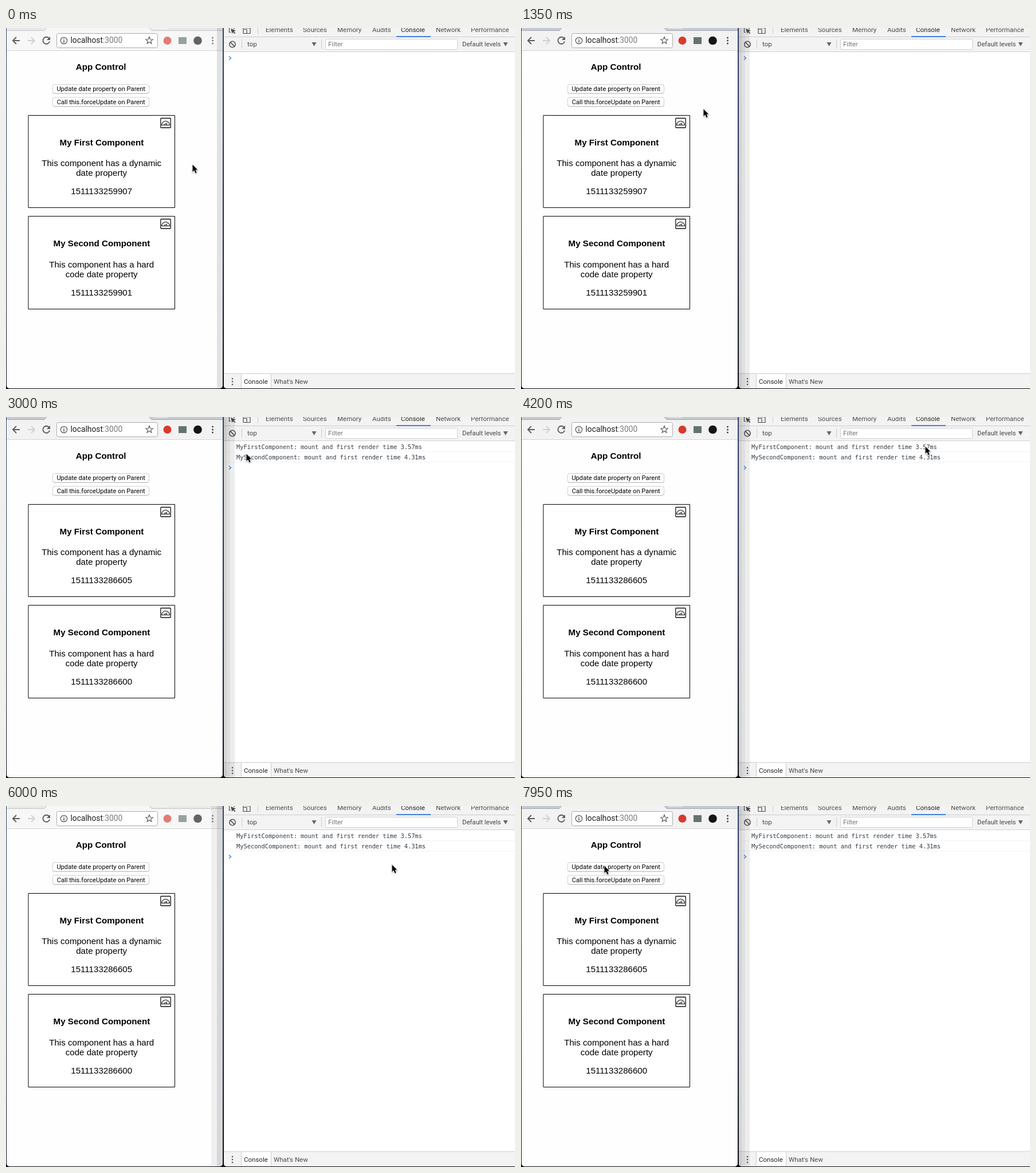
An HTML page with a canvas for the animation above (8000 ms loop, 888 px wide and 630 px high).

```html
<!DOCTYPE html>
<html lang="en">
<head>
<meta charset="utf-8">
<title>Render timing demo</title>
<style>
html, body { margin: 0; width: 100%; height: 100%; overflow: hidden; background: #fff; }
canvas { display: block; }
</style>
</head>
<body>
<canvas id="stage" width="888" height="630"></canvas>
<script>
const ctx = document.getElementById('stage').getContext('2d');
const LOOP = 8000, STEP = 150;
const SANS = '"Liberation Sans", Arial, sans-serif';
const UI = 'Roboto, sans-serif';
const MONO = '"DejaVu Sans Mono", monospace';
const BODY = '15.1px ' + SANS, HEAD = 'bold 15.2px ' + SANS;

// Pointer keys: time, x, y
const PATH = [
  [0, 325, 238], [300, 325, 238], [450, 327, 242], [600, 326, 243], [1050, 326, 243],
  [1200, 324, 205], [1350, 318, 141], [1500, 225, 80], [1650, 120, 40], [1800, 76, 22],
  [1950, 71, 19], [2550, 71, 19], [2700, 95, 24], [2850, 240, 45], [3000, 419, 64],
  [3150, 540, 68], [3300, 610, 60], [3600, 643, 53], [3750, 674, 52], [4050, 674, 52],
  [4200, 705, 51], [4500, 707, 51], [4950, 680, 50], [5100, 680, 50], [5400, 700, 58],
  [5700, 694, 82], [6000, 673, 102], [6150, 672, 103], [6450, 600, 108], [6750, 390, 112],
  [7050, 318, 112], [7200, 316, 112], [7500, 235, 108], [7800, 152, 104], [7950, 145, 104]
];

function pointerAt(t) {
  const i = PATH.findIndex(k => k[0] >= t);
  if (i <= 0) return PATH[0].slice(1);
  const [t0, x0, y0] = PATH[i - 1], [t1, x1, y1] = PATH[i];
  const p = (t - t0) / (t1 - t0);
  return [x0 + (x1 - x0) * p, y0 + (y1 - y0) * p];
}

function rect(x, y, w, h, color) {
  ctx.fillStyle = color;
  ctx.fillRect(x, y, w, h);
}

function text(s, x, y, font, color = '#000', align = 'left') {
  ctx.font = font;
  ctx.fillStyle = color;
  ctx.textAlign = align;
  ctx.fillText(s, x, y);
}

function box(x, y, w, h, r, stroke, fill) {
  ctx.beginPath();
  ctx.roundRect(x, y, w, h, r);
  if (fill) { ctx.fillStyle = fill; ctx.fill(); }
  if (stroke) { ctx.strokeStyle = stroke; ctx.stroke(); }
}

function path(d, stroke, width = 1, fill) {
  const p = new Path2D(d);
  ctx.lineWidth = width;
  if (fill) { ctx.fillStyle = fill; ctx.fill(p); }
  if (stroke) { ctx.strokeStyle = stroke; ctx.stroke(p); }
  ctx.lineWidth = 1;
}

function disc(x, y, r, fill, stroke, width = 1) {
  ctx.beginPath();
  ctx.arc(x, y, r, 0, Math.PI * 2);
  ctx.lineWidth = width;
  if (fill) { ctx.fillStyle = fill; ctx.fill(); }
  if (stroke) { ctx.strokeStyle = stroke; ctx.stroke(); }
  ctx.lineWidth = 1;
}

function dots(x, y, gap, r, color) {
  for (let i = -1; i < 2; i++) disc(x, y + i * gap, r, color);
}

function star(cx, cy) {
  ctx.beginPath();
  for (let i = 0; i < 10; i++) {
    const a = i * Math.PI / 5 - Math.PI / 2, r = i % 2 ? 2.8 : 6.5;
    ctx.lineTo(cx + r * Math.cos(a), cy + r * Math.sin(a));
  }
  ctx.closePath();
  ctx.lineWidth = 1.2;
  ctx.strokeStyle = '#5a5a5a';
  ctx.stroke();
  ctx.lineWidth = 1;
}

function toolbar(focused) {
  const bar = focused ? '#f2f2f2' : '#f7f7f7';
  rect(1, 0, 377, 5, focused ? '#c5c9d1' : '#e8e9ea');
  path('M67 5L71 0H250L254 5Z', null, 1, bar);
  path('M1 4.5H67L71 0M250 0L254 4.5H378', focused ? '#a5a8ae' : '#c4c4c4');
  path('M256 0L258 2H281L283 0Z', null, 1, focused ? '#d9dce1' : '#f2f2f2');
  rect(1, 5, 377, 34, bar);
  rect(1, 39, 377, 1, '#d5d5d5');

  path('M24 22H12.5M18 16L12 22L18 28', '#5a5a5a', 1.8);
  path('M38 22H49.5M44 16L50 22L44 28', '#d0d0d0', 1.8);
  path('M75.3 18.2A6 6 0 1 0 76.2 23.5', '#5a5a5a', 1.8);
  path('M77 15V21H71Z', null, 1, '#5a5a5a');

  box(88.5, 9.5, 176, 25, 3, '#acacac', '#fff');
  disc(101, 22, 5.7, null, '#555', 1.2);
  rect(100.3, 21, 1.5, 4.5, '#555');
  rect(100.3, 18.5, 1.5, 1.5, '#555');
  text('localhost', 112.5, 26, '13.8px ' + UI, '#202020');
  text(':3000', 169, 26, '13.8px ' + UI, '#7a7a7a');
  star(250, 22);

  ctx.globalAlpha = focused ? 1 : 0.65;
  disc(281.5, 22, 7, '#d93a2b');
  rect(301, 16, 14, 12, '#65736f');
  disc(334.5, 22, 7.3, '#141414');
  dots(360.5, 22, 5, 1.5, '#4a4a4a');
  ctx.globalAlpha = 1;
}

function button(label, y) {
  box(81.5, y + 1, 168, 15.5, 3.5, '#b5b5b5', '#fff');
  box(81.5, y + 0.5, 168, 15.5, 3.5, '#d0d0d0', '#fff');
  text(label, 165.7, y + 12, '11.15px ' + UI, '#000', 'center');
}

function gauge(x, y) {
  ctx.lineWidth = 1.3;
  box(x, y, 17.5, 16.5, 1, '#111', '#fff');
  ctx.lineWidth = 1;
  ctx.save();
  ctx.translate(x + 8.7, y + 12);
  path('M-7 0A7 7 0 0 1 7 0Z', '#111', 1.1);
  path('M-2.5 0A2.5 2.5 0 0 1 2.5 0M0 -1L3 -4.5', '#111', 1);
  ctx.restore();
}

function card(y, title, lines, stamp) {
  box(39, y + 0.5, 255.5, lines.h, 0, '#000', '#fff');
  gauge(269.8, y + 5.5);
  text(title, 166.9, y + 52.5, HEAD, '#000', 'center');
  lines.rows.forEach((s, i) =>
    text(s, 166.7, y + lines.y + i * 17, BODY, '#000', 'center'));
  text(stamp, 166.7, y + lines.y + 49, BODY, '#000', 'center');
}

function browser(focused, reloaded, shade) {
  ctx.save();
  ctx.beginPath();
  ctx.roundRect(1, -10, 377, 639, 5);
  ctx.clip();
  rect(1, 0, 377, 630, '#fefefe');
  toolbar(focused);
  text('App Control', 165.7, 73, HEAD, '#000', 'center');
  button('Update date property on Parent', 98);
  button('Call this.forceUpdate on Parent', 120.5);
  card(152, 'My First Component',
    { h: 161, y: 89, rows: ['This component has a dynamic', 'date property'] },
    reloaded ? '1511133286605' : '1511133259907');
  card(328, 'My Second Component',
    { h: 162, y: 90, rows: ['This component has a hard', 'code date property'] },
    reloaded ? '1511133286600' : '1511133259901');
  shade.forEach((a, i) => rect(358 + i * 10, 0, 10, 630, `rgba(0,0,0,${a})`));
  ctx.restore();
}

function devtools(reloaded, shaded, hot) {
  const ui = '11.5px ' + UI, ink = '#4c4c4c';
  ctx.save();
  ctx.beginPath();
  ctx.roundRect(380, -10, 520, 639, 5);
  ctx.clip();
  rect(380, 0, 508, 630, '#fff');
  rect(380, 0, 508, 41, '#f3f3f3');
  rect(380, 15, 508, 1, '#ccc');
  rect(380, 41, 508, 1, '#d0d0d0');

  path('M389.5 0V7.5H392M398 0V2', ink, 1.2);
  path('M392 1L401 4.5L397.5 6L400.5 9L399 10L396 7.3L394.5 10Z', null, 1, ink);
  path('M414 0V9.5H420M416 0H426V9.5H420V2.5H414', ink, 1.2);
  rect(439, 0, 1, 10, '#ccc');
  [['Elements', 453], ['Sources', 518], ['Memory', 578], ['Audits', 639],
    ['Console', 689], ['Network', 750], ['Performance', 811]].forEach(([s, x]) =>
    text(s, x, 7, ui, s === 'Console' ? '#222' : ink));
  rect(681, 14, 60, 2, '#3f7fe0');

  if (hot) rect(384, 17, 22, 24, '#e4e4e4');
  disc(395, 28.5, 5.2, null, ink, 1.5);
  path('M391.4 24.9L398.6 32.1', ink, 1.5);
  rect(411, 20, 1, 16, '#ccc');
  text('top', 421, 32, ui, '#444');
  path('M533.5 25H541.5L537.5 32Z', null, 1, '#666');
  rect(550, 20, 1, 16, '#ccc');
  box(557.5, 19.5, 230, 18, 1, '#d0d0d0', '#fff');
  text('Filter', 562, 32, ui, '#757575');
  text('Default levels', 796, 32, '11.25px ' + UI, '#444');
  path('M867.5 25H875.5L871.5 32Z', null, 1, '#666');

  if (reloaded) {
    const log = '10.35px ' + MONO, tail = ': mount and first render time ';
    text('MyFirstComponent' + tail + '3.57ms', 402, 55.5, log, '#303942');
    text('MySecondComponent' + tail + '4.31ms', 402, 73.5, log, '#303942');
    rect(384, 60, 504, 1, '#f4f4f4');
    rect(384, 78, 504, 1, '#f4f4f4');
  }
  const py = reloaded ? 88.5 : 52.5;
  path(`M389 ${py - 3}L392.5 ${py}L389 ${py + 3}`, '#3b82ec', 1.4);

  rect(380, 603, 508, 26, '#f3f3f3');
  rect(380, 602.5, 508, 1, '#ccc');
  dots(395, 617, 5, 1.3, '#555');
  rect(410, 604, 53, 25, '#ccc');
  rect(411, 604, 51, 25, '#fff');
  text('Console', 415, 621, ui, '#222');
  text("What's New", 467, 621, ui, ink);

  if (shaded) {
    rect(380, 0, 5, 630, 'rgba(0,0,0,.17)');
    rect(385, 0, 6, 630, 'rgba(0,0,0,.12)');
    rect(391, 0, 8, 630, 'rgba(0,0,0,.07)');
  }
  ctx.restore();
}

function pointer(x, y) {
  ctx.save();
  ctx.translate(x, y);
  ctx.shadowColor = 'rgba(0,0,0,.35)';
  ctx.shadowBlur = 2;
  ctx.shadowOffsetY = 1;
  const d = 'M0.5 0.5V13L3.3 10.3L5.5 15.3L7.7 14.3L5.6 9.6H9.3Z';
  path(d, '#fff', 1.6);
  ctx.shadowColor = 'transparent';
  path(d, null, 1, '#000');
  ctx.restore();
}

function draw(ms) {
  const t = Math.floor((ms % LOOP) / STEP) * STEP;
  const left = (t >= 150 && t < 4500) || t >= 7050;
  const reloaded = t >= 2250;
  const desk = ctx.createLinearGradient(0, 0, 0, 630);
  desk.addColorStop(0, '#33456b');
  desk.addColorStop(0.6, '#1d2746');
  desk.addColorStop(1, '#080a12');
  rect(0, 0, 888, 630, desk);
  browser(left, reloaded, left ? [] : t < 150 ? [0, 0.11] : [0.06, 0.15]);
  devtools(reloaded, left, t >= 4500 && t < 5250);
  pointer(...pointerAt(t));
}

function tick(now) {
  draw(now);
  requestAnimationFrame(tick);
}
draw(0);
requestAnimationFrame(tick);
</script>
</body>
</html>
```
